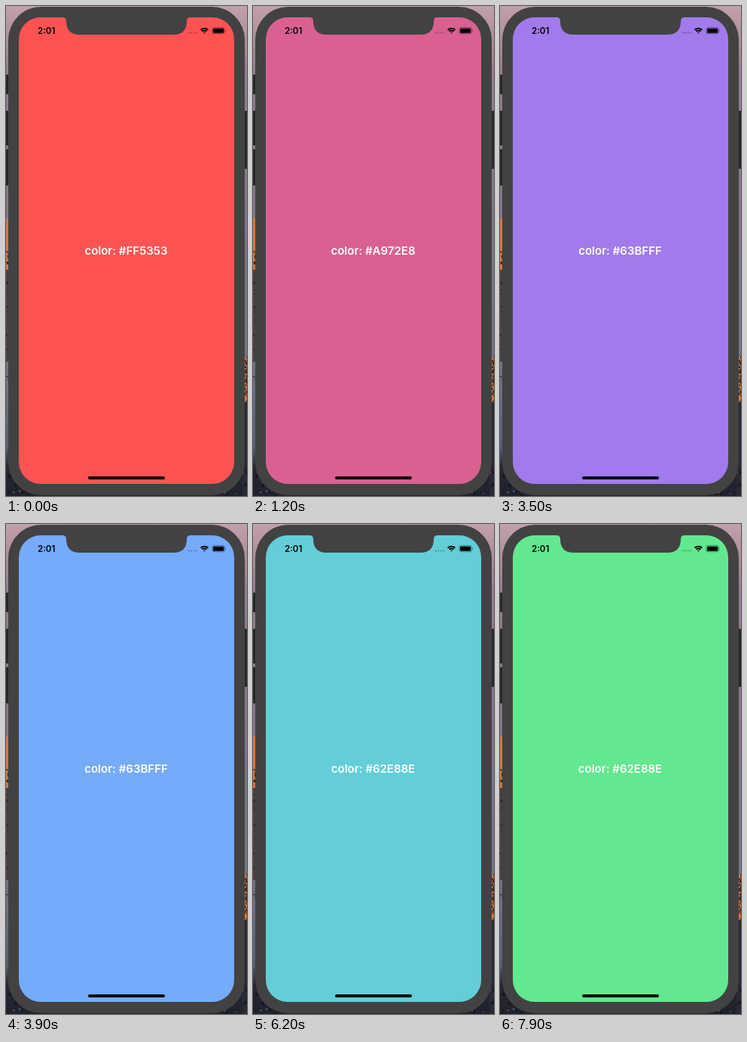
These frames come from a looping animation (320 by 650 pixels, 8 s). An HTML page:

```html
<!DOCTYPE html>
<html lang="en">
<head>
<meta charset="utf-8">
<title>Color fade</title>
<style>
  html, body { margin: 0; width: 100%; height: 100%; overflow: hidden; }
  svg { display: block; width: 320px; height: 650px; }
  text { font-family: Inter, Roboto, sans-serif; font-weight: 600; }
</style>
</head>
<body>
<svg viewBox="0 0 320 650">
  <defs>
    <linearGradient id="sky" x2="0" y2="1">
      <stop offset="0" stop-color="#c3a0aa"/>
      <stop offset=".13" stop-color="#987d8f"/>
      <stop offset=".4" stop-color="#857689"/>
      <stop offset=".75" stop-color="#737389"/>
      <stop offset=".9" stop-color="#566078"/>
      <stop offset=".94" stop-color="#252833"/>
      <stop offset="1" stop-color="#1f222c"/>
    </linearGradient>
  </defs>
  <rect width="320" height="650" fill="url(#sky)"/>
  <!-- wallpaper at the edges -->
  <path d="M0 282h6v68h-6zM314 465h6v60h-6z" fill="#d9763e"/>
  <path d="M0 350h6v122h-6z" fill="#4b4144"/>
  <path d="M314 525h6v125h-6z" fill="#292a33"/>
  <g id="specks"></g>
  <!-- side buttons -->
  <path d="M0 91h6v26h-6zM0 139h6v46h-6zM0 190h6v48h-6zM314 139h6v77h-6z" fill="#292829"/>
  <rect x="3" y="1" width="314" height="648" rx="44" fill="#424242"/>
  <rect id="screen" x="17" y="15" width="286" height="619" rx="29"/>
  <path d="M75 14v1q5 0 5 5q0 18 18 18h124q18 0 18-18q0-5 5-5v-1z" fill="#424242"/>
  <text x="42" y="37" font-size="11.5">2:01</text>
  <path d="M242 35.5h12" stroke="#000" stroke-opacity=".4" stroke-width="1.4" stroke-dasharray="1.5 2"/>
  <g fill="none" stroke="#000" stroke-width="1.9">
    <path d="M258.6 31.7a7.1 7.1 0 0 1 9.8 0M260.6 33.8a4.2 4.2 0 0 1 5.8 0"/>
    <path d="M262 34.9h3l-1.5 1.7z" fill="#000" stroke="none"/>
  </g>
  <rect x="273.9" y="28.6" width="16.4" height="8.2" rx="2.2" fill="none" stroke="#000" stroke-opacity=".5" stroke-width=".8"/>
  <rect x="275" y="29.7" width="14.2" height="6" rx="1.2"/>
  <path d="M291.2 31.2q1.5 1.5 0 3z" opacity=".6"/>
  <rect x="109" y="624" width="102" height="4" rx="2"/>
  <text id="label" x="159.5" y="330" font-size="15" fill="#fff" text-anchor="middle"></text>
</svg>
<script>
const LOOP = 8000, FIRST = 740, EVERY = 2520, FADE = 1000;
const colors = ["#FF5353", "#A972E8", "#63BFFF", "#62E88E"];
const screenEl = document.getElementById("screen");
const label = document.getElementById("label");
const rgb = hex => [1, 3, 5].map(i => parseInt(hex.slice(i, i + 2), 16));
const ease = p => p < .5 ? 2 * p * p : 1 - 2 * (1 - p) ** 2;

let seed = 7;
const rand = () => (seed = seed * 16807 % 2147483647) / 2147483647;

function speck(x, y, fill) {
  return `<rect x="${x}" y="${y}" width="${1 + rand() * 2}" height="${1 + rand() * 3}" fill="${fill}"/>`;
}

let specks = "";
for (let i = 0; i < 45; i++) {
  specks += speck(rand() * 4, 325 + rand() * 180, "#282429");
  specks += speck(316 + rand() * 4, 463 + rand() * 65, "#35292a");
}
for (let i = 0; i < 60; i++) {
  const x = rand() * 36;
  specks += speck(i % 2 ? x : 319 - x, 610 + rand() * 40, i % 3 ? "#13161e" : "#4c5973");
}
document.getElementById("specks").innerHTML = specks;

function draw(t) {
  const step = Math.floor((t - FIRST) / EVERY) + 1;
  const to = colors[step];
  const from = rgb(colors[Math.max(step - 1, 0)]);
  const start = FIRST + (step - 1) * EVERY;
  const k = ease(Math.min((t - start) / FADE, 1));
  const mixed = step ? rgb(to).map((v, i) => Math.round(from[i] + (v - from[i]) * k)) : from;
  screenEl.setAttribute("fill", `rgb(${mixed})`);
  const caption = "color: " + to;
  if (label.textContent !== caption) label.textContent = caption;
}

const origin = performance.now();
function tick() {
  draw((performance.now() - origin) % LOOP);
  requestAnimationFrame(tick);
}
tick();
</script>
</body>
</html>
```
